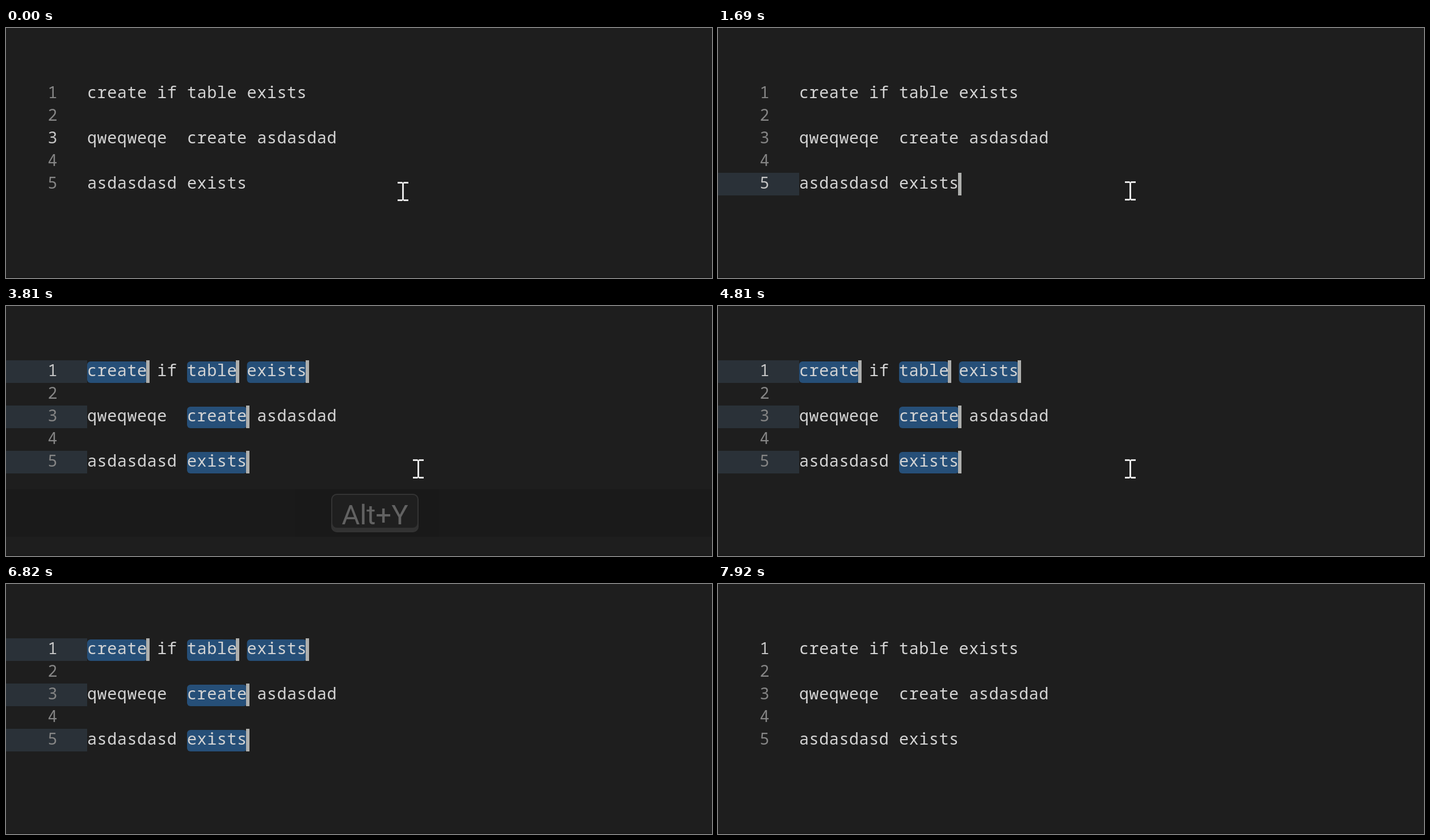
An HTML page that plays this animation: 1244x442 px, repeating every 8.04 s.

```html
<!DOCTYPE html>
<html lang="en">
<head>
<meta charset="utf-8">
<title>Multi-cursor selection</title>
<style>
  html, body { margin: 0; width: 100%; height: 100%; overflow: hidden; background: #1e1e1e; }
  svg { display: block; }
  .code text { font: 28.5px "Noto Sans Mono", monospace; letter-spacing: .5px; white-space: pre; fill: #d4d4d4; }
  .code .number { fill: #858585; }
  .code .number.active { fill: #c6c6c6; }
  .gutter { fill: #2a3138; }
  .selection { fill: #264f78; }
  .caret { fill: #aeafad; }
  .key text { font: 49px Roboto, sans-serif; fill: #fff; text-anchor: middle; }
</style>
</head>
<body>
<svg width="1244" height="442" viewBox="0 0 1244 442">
  <rect y="440" width="1244" height="2" fill="#191919"/>
  <g class="code" id="code"></g>
  <g class="key" id="key">
    <rect y="324" width="1244" height="84" fill="#000" fill-opacity=".5"/>
    <rect x="573" y="332" width="154" height="68" rx="10" fill="#ddd" fill-opacity=".1"/>
    <rect x="574" y="333" width="152" height="66" rx="9" fill="none" stroke="#ccc" stroke-opacity=".4" stroke-width="2"/>
    <path d="M575 384a8 8 0 0 0 8 8H717a8 8 0 0 0 8-8V390a8 8 0 0 1-8 8H583a8 8 0 0 1-8-8Z" fill="#bababa" fill-opacity=".4"/>
    <text x="650" y="386">Alt+Y</text>
  </g>
  <path id="pointer" fill="#e6e6e6" d="M0 0H8L9.5 1.5 11 0H19V3H11V31H19V34H11L9.5 32.5 8 34H0V31H8V3H0Z"/>
</svg>
<script>
const LOOP = 8040, LEFT = 143, ADVANCE = 17.6, TOP = 96, ROW = 40;
const lines = ["create if table exists", "", "qweqweqe  create asdasdad", "", "asdasdasd exists"];
const keywords = /create|table|exists/g;
const code = document.getElementById("code");
const key = document.getElementById("key");
const pointer = document.getElementById("pointer");

// [start time, value] steps; each value holds until the next step
const activeLine = [[0, 2], [700, 4], [3810, 0]];
const keyOpacity = [[0, 0], [3810, .3], [3930, .75], [4030, 1], [4610, 0]];
const pointerAt = [
  [0, [690, 272]], [100, [731, 272]], [190, [728, 272]], [700, [724, 276]], [810, [717, 271]],
  [6320, [779, 312]], [6420, [953, 404]], [6520, null]
];
const blinks = [700, 1200, 1690, 2190, 2700, 3210, 3710, 4310, 4810, 5310, 5810, 6320, 6820, 7320, 7820];

const valueAt = (steps, t) => steps.filter(([start]) => start <= t).pop()[1];
const show = (node, on) => node.setAttribute("visibility", on ? "visible" : "hidden");

function add(tag, attributes, content = "") {
  const node = document.createElementNS("http://www.w3.org/2000/svg", tag);
  for (const name in attributes) node.setAttribute(name, attributes[name]);
  node.textContent = content;
  return code.appendChild(node);
}

const addCaret = (column, y) =>
  add("rect", { class: "caret", x: Math.round(LEFT + column * ADVANCE) - 2, y, width: 6, height: ROW });

const gutters = [], selections = [], carets = [], numbers = [];
let clickCaret;

lines.forEach((line, row) => {
  const y = TOP + row * ROW;
  if (line) gutters[row] = add("rect", { class: "gutter", y, width: LEFT, height: ROW });
  const words = [...line.matchAll(keywords)];
  for (const { 0: word, index } of words) {
    selections.push(add("rect", {
      class: "selection", x: LEFT + index * ADVANCE, y: y + 2,
      width: word.length * ADVANCE, height: ROW - 2, rx: 6
    }));
  }
  numbers.push(add("text", { x: 73.4, y: y + 28 }, row + 1));
  add("text", { x: LEFT, y: y + 28 }, line);
  for (const { 0: word, index } of words) carets.push(addCaret(index + word.length, y));
  clickCaret = carets[carets.length - 1];
});

function draw(t) {
  const clicked = t >= 700 && t < 3810;
  const selected = t >= 3810 && t < 7920;
  const caretOn = blinks.filter(time => time <= t).length % 2 === 1;

  gutters.forEach((node, row) => show(node, selected || (clicked && row === 4)));
  selections.forEach(node => show(node, selected));
  carets.forEach(node => show(node, caretOn && (selected || (clicked && node === clickCaret))));
  numbers.forEach((node, row) =>
    node.setAttribute("class", row === valueAt(activeLine, t) ? "number active" : "number"));
  key.setAttribute("opacity", valueAt(keyOpacity, t));

  const position = valueAt(pointerAt, t);
  show(pointer, position);
  if (position) pointer.setAttribute("transform", `translate(${position})`);
}

const start = performance.now();
function tick() {
  draw((performance.now() - start) % LOOP);
  requestAnimationFrame(tick);
}
tick();
</script>
</body>
</html>
```
